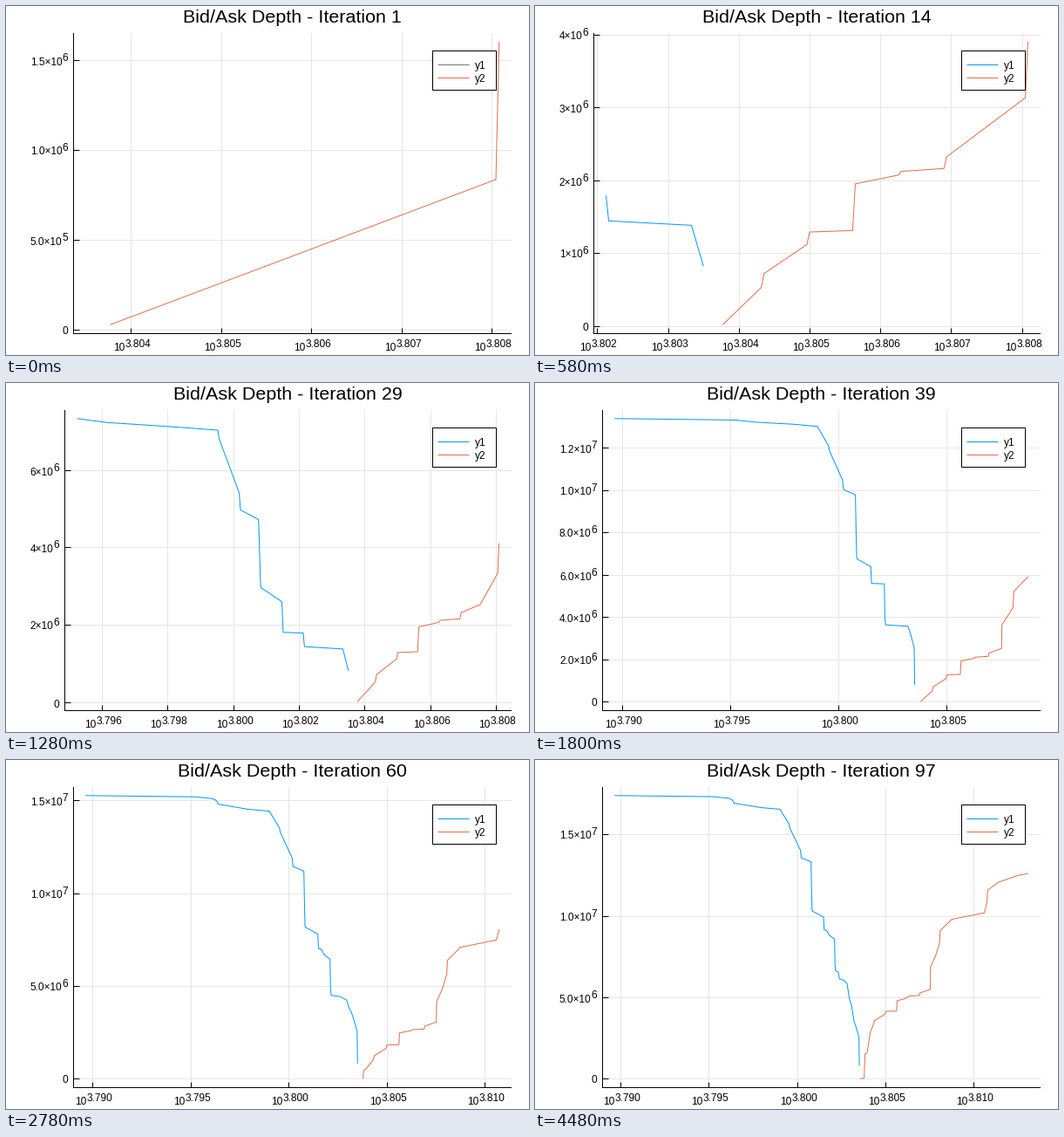
A matplotlib script for the animation above (4500 ms loop, 600 by 400 pixels).

```python
import math

import matplotlib.pyplot as plt
import numpy as np
from matplotlib.animation import FuncAnimation
from matplotlib.collections import LineCollection
from matplotlib.patches import Rectangle

W, H, DPI = 600, 400, 100
PT = 72 / DPI
RIGHT, TOP, BOTTOM = 580, 31, 375
BLUE, ORANGE, GREY = "#009afa", "#e26f46", "#777777"
TICK_PX, TITLE_PX = 11.9, 21.5
DIGIT = 0.556 * TICK_PX
RAISE = 4.2
MAX_TICKS = 10


# Prices are 1000 * (log10 price - 3.8), sizes are in millions.
def ladder(start, step, gap, sizes):
    """Pairs of neighbouring orders at evenly spaced prices."""
    return [(start + step * (i // 2) + gap * (i % 2), size)
            for i, size in enumerate(sizes)]


def spread(first, last, orders):
    """Let orders arrive evenly between two iterations."""
    times = np.linspace(first, last, len(orders)).round()
    return [(t, price, size) for t, (price, size) in zip(times, orders)]


ask_rungs = ladder(4.313, .645, .037,
                   (.51, .19, .4, .17, .02, .64, .12, .05, .04, .16))
bid_rungs = ladder(2.156, -.65, -.037,
                   (.06, .35, .02, .79, .35, .06, .25, .44, 1.4, .22))
tail = [(price, .1) for price in (-2.08, -3.89, -4.77)]

ASKS = (
    spread(1, 1, [(3.767, .028), (8.043, .81), (8.079, .77)])
    + spread(2, 14, ask_rungs)
    + spread(22, 45, [(7.51, .21), (7.53, 1.12), (8.74, .69), (7.81, .64)])
    + spread(50, 58, [(3.82, .47), (10.58, .4), (10.715, .56), (3.94, .07)])
    + spread(64, 76, [(6.05, .1), (7.52, .28)])
    + spread(79, 97, [(4.12, 1.27), (13.06, .1), (10.77, .84), (11.38, .48),
                      (12.52, .43), (3.82, 1.03), (3.555, .03)])
)
BIDS = (
    spread(1, 13, [(3.494, .83), (3.326, .56)] + bid_rungs[:2])
    + spread(15, 29, bid_rungs[2:] + [(.76, 1.71)] + tail)
    + spread(30, 47, [(3.475, 1.75), (2.095, 1.59), (.79, 1.27), (-1, .92),
                      (-10.37, .07), (3.19, .45), (3.06, .26), (2.94, .41),
                      (2.6, .2), (1.64, .3), (-3.7, .2)])
    + spread(50, 58, [(1.79, .26), (-3.6, .27)])
    + spread(63, 75, [(3.06, .65), (2.8, .97), (2.37, .08)])
    + spread(86, 86, [(2.3, .43)])
)


def depth(orders, iteration, descending=False):
    """Prices and cumulative sizes, walking away from the best price."""
    book = {}
    for when, price, size in orders:
        if when <= iteration:
            book[price] = book.get(price, 0) + size
    prices = sorted(book, reverse=descending)
    return np.array(prices), np.cumsum([book[p] for p in prices])


def widen(*arrays):
    values = np.concatenate(arrays)
    lo, hi = values.min(), values.max()
    pad = 0.03 * (hi - lo)
    return lo - pad, hi + pad


def nice_ticks(lo, hi):
    """Ticks scored by count, coverage and roundness of the step."""
    best, best_score = [], -1
    power = math.floor(math.log10(hi - lo))
    for z in (power - 1, power):
        for q, niceness in ((1, 1), (5, .9), (2, .7)):
            step = q * 10.0 ** z
            first, last = math.ceil(lo / step), math.floor(hi / step)
            count = last - first + 1
            if not 4 <= count <= 9:
                continue
            score = ((1 - abs(count - 5) / 5) / 4 + niceness / 4
                     + 0.5 * (hi - lo) / ((count - 1) * step))
            if score > best_score:
                best = [k * step for k in range(first, last + 1)]
                best_score = score
    return best


def size_labels(ticks):
    """(base, exponent) pairs in scientific notation, ticks in millions."""
    parts = []
    for t in ticks:
        if abs(t) < 1e-9:
            parts.append(None)
            continue
        e = math.floor(math.log10(t) + 1e-9)
        parts.append((round(t / 10.0 ** e, 6), e + 6))
    whole = all(p is None or p[0] == round(p[0]) for p in parts)
    digits = 0 if whole else 1
    labels = [("0", "") if p is None else (f"{p[0]:.{digits}f}×10", str(p[1]))
              for p in parts]
    return labels, whole


def crisp(v):
    """Centre of the pixel that holds v."""
    return math.floor(v) + 0.5


plt.rcParams["font.family"] = "Liberation Sans"
fig = plt.figure(figsize=(W / DPI, H / DPI), dpi=DPI, facecolor="white")
ax = fig.add_axes([0, 0, 1, 1])
ax.set_xlim(0, W)
ax.set_ylim(H, 0)
ax.axis("off")


def text(x, y, s="", px=TICK_PX, ha="left"):
    return ax.text(x, y, s, fontsize=px * PT, ha=ha, va="baseline",
                   color="black", zorder=6)


def strokes(color, z):
    lines = LineCollection([], colors=color, linewidths=PT, zorder=z,
                           snap=False)
    ax.add_collection(lines, autolim=False)
    return lines


def curve(color, z, xs=(), ys=()):
    return ax.plot(xs, ys, color=color, lw=PT, zorder=z, snap=False,
                   solid_capstyle="butt", solid_joinstyle="round")[0]


grid = strokes("#e6e6e6", 1)
frame = strokes("black", 2)
bid_line = curve(BLUE, 3)
ask_line = curve(ORANGE, 3)

ax.add_patch(Rectangle((489.5, 51.5), 73, 45, fc="white", ec="black",
                       lw=PT, zorder=4, snap=False))
bid_key = curve(BLUE, 5, (495.5, 531.5), (67.5, 67.5))
curve(ORANGE, 5, (495.5, 531.5), (82.5, 82.5))
text(538, 72.3, "y1")
text(538, 87.3, "y2")

title = text(0, 18.6, px=TITLE_PX, ha="center")
x_texts = [(text(0, 0, ha="right"), text(0, 0)) for _ in range(MAX_TICKS)]
y_texts = [(text(0, 0, ha="right"), text(0, 0, ha="right"))
           for _ in range(MAX_TICKS)]


def put(pair, base, exponent, base_x, exp_x, y):
    for artist, s, x, dy in zip(pair, (base, exponent), (base_x, exp_x),
                                (0, RAISE)):
        artist.set_text(s)
        artist.set_position((x, y - dy))


def draw(iteration):
    bid_x, bid_y = depth(BIDS, iteration, descending=True)
    ask_x, ask_y = depth(ASKS, iteration)
    x_lo, x_hi = widen(bid_x, ask_x)
    y_lo, y_hi = widen(bid_y, ask_y)
    x_ticks, y_ticks = nice_ticks(x_lo, x_hi), nice_ticks(y_lo, y_hi)
    labels, whole = size_labels(y_ticks)
    left = 67 if whole else 77

    def px(x):
        return left + (x - x_lo) / (x_hi - x_lo) * (RIGHT - left)

    def py(y):
        return BOTTOM - (y - y_lo) / (y_hi - y_lo) * (BOTTOM - TOP)

    bid_line.set_data(px(bid_x), py(bid_y))
    ask_line.set_data(px(ask_x), py(ask_y))
    bid_key.set_color(BLUE if len(bid_x) > 1 else GREY)

    wall, floor = crisp(left), crisp(BOTTOM)
    grid_segs = []
    frame_segs = [[(wall, TOP), (wall, floor + 0.5)],
                  [(wall, floor), (RIGHT, floor)]]

    for pair in x_texts + y_texts:
        put(pair, "", "", 0, 0, 0)
    for pair, t in zip(x_texts, x_ticks):
        x = crisp(px(t))
        grid_segs.append([(x, TOP), (x, floor)])
        frame_segs.append([(x, floor), (x, floor - 6)])
        joint = x + 1 - 3.614 * TICK_PX / 2 + 2 * DIGIT
        put(pair, "10", f"{3.8 + t / 1000:.3f}", joint, joint, 395)
    for pair, t, (base, exponent) in zip(y_texts, y_ticks, labels):
        y = crisp(py(t))
        grid_segs.append([(wall, y), (RIGHT, y)])
        frame_segs.append([(wall, y), (wall + 7, y)])
        edge = wall - 6.3
        base_x = edge - DIGIT if exponent else edge
        put(pair, base, exponent, base_x, edge, y + 5)

    grid.set_segments(grid_segs)
    frame.set_segments(frame_segs)
    title.set_text(f"Bid/Ask Depth - Iteration {iteration}")
    title.set_x((left + RIGHT) / 2 + 0.3)


def update(i):
    # Three iterations per 140 ms, the middle one held for 100 ms
    cycle, rest = divmod(i, 7)
    draw(3 * cycle + (0 if rest == 0 else 1 if rest < 6 else 2) + 1)
    return []


anim = FuncAnimation(fig, update, frames=225, interval=20,
                     init_func=lambda: update(0), repeat=True,
                     repeat_delay=0, blit=False)
plt.show()
```
